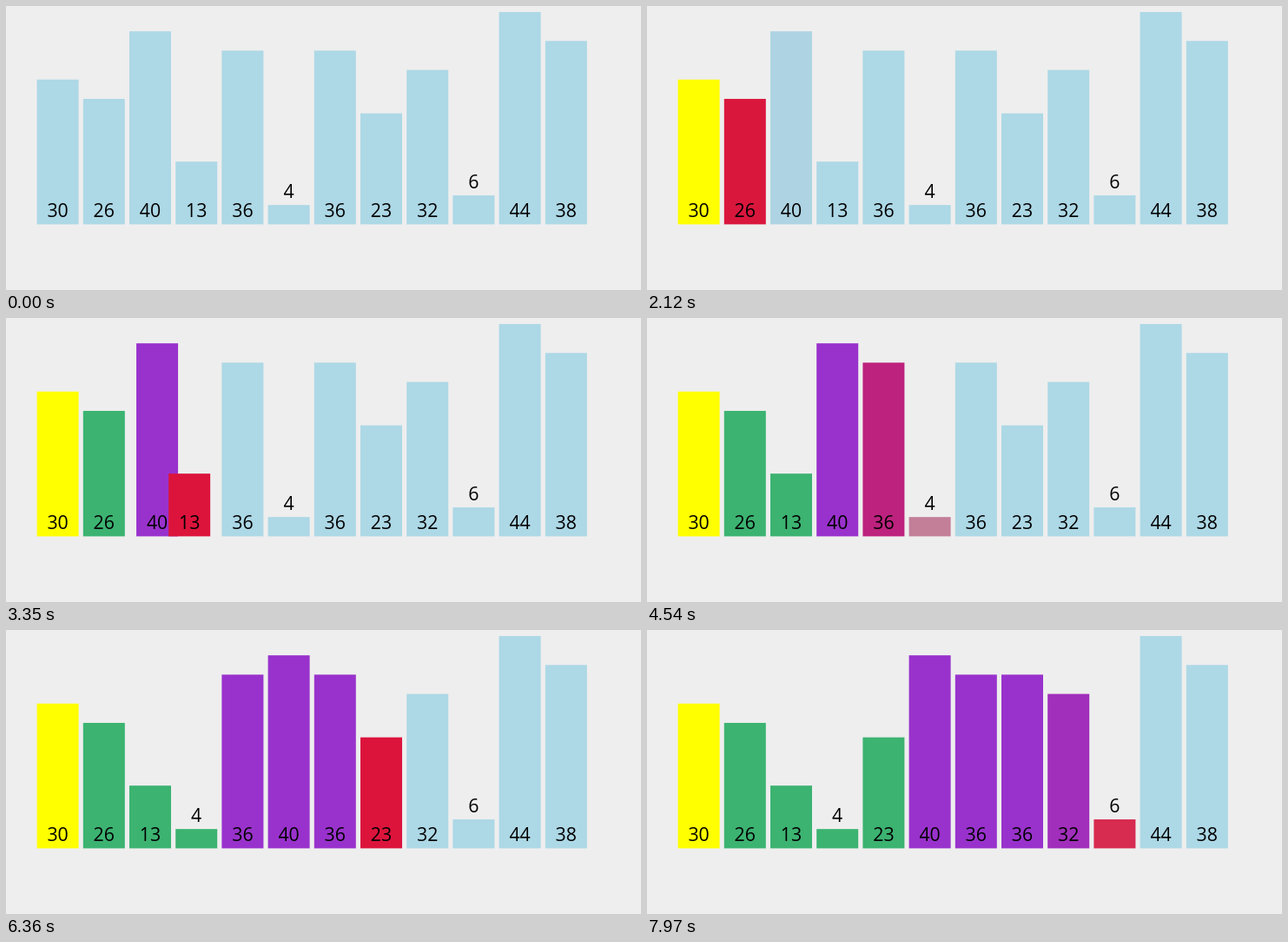
Recreate the animation shown at these times as an HTML page. Size 731x327 px, loop 7.99 s.

```html
<!DOCTYPE html>
<html lang="en">
<head>
<meta charset="utf-8">
<title>Partition step</title>
<style>
  html, body { margin: 0; width: 100%; height: 100%; overflow: hidden; background: #eee; }
  svg { display: block; width: 731px; height: 327px; }
  text { font: 21.3px "Open Sans", "Noto Sans", sans-serif; text-anchor: middle; }
</style>
</head>
<body>
<svg id="stage" viewBox="0 0 731 327"></svg>
<script>
(() => {
  const LOOP = 7990, LEFT = 35.6, PITCH = 53.2, WIDTH = 48, BASE = 251.4, UNIT = 5.556;
  const values = [30, 26, 40, 13, 36, 4, 36, 23, 32, 6, 44, 38];

  const BLUE = [173, 216, 230], YELLOW = [255, 255, 0], RED = [220, 20, 60],
        GREEN = [60, 179, 113], PURPLE = [153, 50, 204];

  // Bars are named by their starting slot.
  const steps = [
    { at: 440, dur: 340, paint: { 0: YELLOW } },
    { at: 960, dur: 400, paint: { 1: RED } },
    { at: 2065, dur: 340, paint: { 1: GREEN, 2: RED } },
    { at: 2605, dur: 370, paint: { 2: PURPLE, 3: RED } },
    { at: 3215, dur: 405, swap: [2, 3] },
    { at: 3870, dur: 330, paint: { 3: GREEN, 4: RED } },
    { at: 4365, dur: 362, paint: { 4: PURPLE, 5: RED } },
    { at: 4995, dur: 345, swap: [2, 5] },
    { at: 5530, dur: 330, paint: { 5: GREEN, 6: RED } },
    { at: 6050, dur: 320, paint: { 6: PURPLE, 7: RED } },
    { at: 6570, dur: 405, swap: [4, 7] },
    { at: 7210, dur: 340, paint: { 7: GREEN, 8: RED } },
    { at: 7745, dur: 326, paint: { 8: PURPLE, 9: RED } }
  ];

  const stage = document.getElementById('stage');
  const add = (tag, attrs) => {
    const node = document.createElementNS('http://www.w3.org/2000/svg', tag);
    for (const key in attrs) node.setAttribute(key, attrs[key]);
    return stage.appendChild(node);
  };

  const barTop = value => BASE - value * UNIT;
  const rects = values.map(v => add('rect', { y: barTop(v), width: WIDTH, height: v * UNIT }));
  const labels = values.map(v => {
    const label = add('text', { y: (v < 10 ? barTop(v) : BASE) - 8.2 });
    label.textContent = v;
    return label;
  });

  const clamp = t => Math.min(1, Math.max(0, t));
  const ease = t => t < 0.5 ? 4 * t ** 3 : 1 - 4 * (1 - t) ** 3;
  const mix = (a, b, p) => a + (b - a) * p;

  function draw(time) {
    const slots = values.map((_, i) => i);
    const colors = values.map(() => BLUE);
    for (const { at, dur, paint = {}, swap } of steps) {
      if (time <= at) break;
      const p = ease(clamp((time - at) / dur));
      for (const i in paint) colors[i] = colors[i].map((c, k) => mix(c, paint[i][k], p));
      if (swap) {
        const [i, j] = swap, a = slots[i], b = slots[j];
        slots[i] = mix(a, b, p);
        slots[j] = mix(b, a, p);
      }
    }
    values.forEach((_, i) => {
      const x = LEFT + PITCH * slots[i];
      rects[i].setAttribute('x', x);
      rects[i].setAttribute('fill', `rgb(${colors[i].map(Math.round)})`);
      labels[i].setAttribute('x', x + WIDTH / 2);
    });
  }

  const start = performance.now();
  function tick() {
    draw((performance.now() - start) % LOOP);
    requestAnimationFrame(tick);
  }
  tick();
})();
</script>
</body>
</html>
```
